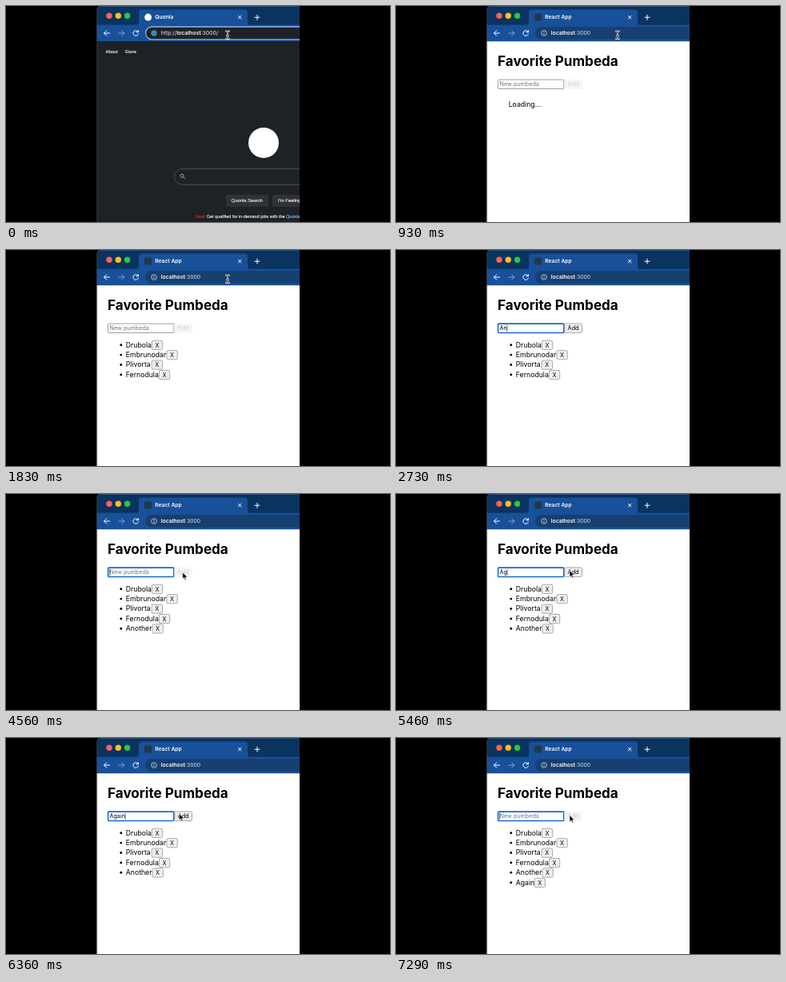
An HTML page for the animation above (8000 ms loop, 480 by 270 pixels).

```html
<!DOCTYPE html>
<html lang="en">
<head>
<meta charset="utf-8">
<title>Favorites</title>
<style>
  html, body { margin: 0; width: 100%; height: 100%; overflow: hidden; background: #000; }
  svg { display: block; width: 100%; height: 100%; }
  text { font-family: Inter, Roboto, sans-serif; white-space: pre; }
  .search { color: #e8eaed; font-family: "Liberation Sans", Arial, sans-serif; }
  .search text { font-family: inherit; fill: currentColor; }
  .search .page, .search .page tspan { fill: currentColor; stroke: currentColor; stroke-width: .16; }
  .line { fill: none; stroke: #fff; stroke-width: 1; stroke-linecap: round; stroke-linejoin: round; }
  .bold { font-weight: 600; }
</style>
</head>
<body>
<svg viewBox="0 0 480 270">
  <defs>
    <clipPath id="window"><path d="M113.5 270V5Q113.5 0 118.5 0H367V270Z"/></clipPath>
  </defs>
  <rect width="480" height="270"/>
  <g clip-path="url(#window)">
    <rect x="113" width="254" height="25" fill="#0a335f"/>
    <rect x="113" y="23.600" width="254" height="21" fill="#18509a"/>
    <path d="M162 24.5Q166 24.5 166 20V8.500Q166 4.500 170 4.500H298Q302 4.500 302 8.500V20Q302 24.500 306 24.500Z" fill="#18509a"/>
    <circle cx="129" cy="12.200" r="3.700" fill="#ff5f57"/>
    <circle cx="140.300" cy="12.200" r="3.700" fill="#febc2e"/>
    <circle cx="151.600" cy="12.200" r="3.700" fill="#28c840"/>
    <rect id="tabIcon" x="173.100" y="9.600" width="9" height="9"/>
    <text id="tabTitle" class="bold" x="186.300" y="16.200" font-size="6.700" fill="#fff"></text>
    <path class="line" d="M290.400 12.200l3.700 3.700m0-3.700l-3.700 3.700M314 11.200v6m-3-3h6"/>
    <path class="line" d="M129.600 34h-7m3.200-3.300l-3.300 3.300l3.300 3.300"/>
    <path class="line" stroke-opacity=".45" d="M140.700 34h7m-3.200-3.300l3.300 3.300l-3.300 3.300"/>
    <path class="line" d="M165 32.200A3.300 3.300 0 1 0 165.400 35M165.400 30.500v2.200h-2.200"/>

    <g id="searchPage" class="search">
      <rect x="174.600" y="26" width="210" height="15.800" rx="7.900" fill="#1f2328" stroke="#8ab8f0" stroke-width="1.300"/>
      <circle cx="185" cy="34" r="3.700" fill="#3f88b2"/>
      <text x="193.700" y="36.200" font-size="6.850" style="font-family:Inter,Roboto,sans-serif">http://<tspan class="bold" fill="#fff">localhost</tspan>:3000/</text>
      <rect x="113" y="44.200" width="254" height="226" fill="#1d2226"/>
      <circle cx="322" cy="171" r="19" fill="#fff"/>
      <rect x="210.500" y="203.700" width="220" height="19.500" rx="9.750" fill="none" stroke="#5f6368" stroke-width=".7"/>
      <path class="line" style="stroke:#aab0b6;stroke-width:.9" d="M222.200 212.300a2.100 2.100 0 1 0-4.200 0a2.100 2.100 0 1 0 4.200 0M221.700 213.900l1.900 2"/>
      <rect x="275" y="236" width="53" height="15" rx="1.800" fill="#303235"/>
      <rect x="333" y="236" width="60" height="15" rx="1.800" fill="#303235"/>
      <text class="page" x="124.600" y="59.200" font-size="5.900">About</text>
      <text class="page" x="148.600" y="59.200" font-size="5.900">Store</text>
      <text class="page" x="281.600" y="245.400" font-size="5.900">Quonla Search</text>
      <text class="page" x="340" y="245.400" font-size="5.900">I'm Feeling Lucky</text>
      <text class="page" x="236.700" y="265.200" font-size="5.480"><tspan color="#d9251d">New!</tspan> Get qualified for in-demand jobs with the <tspan color="#8ab4f8">Quonla</tspan></text>
    </g>

    <g id="appPage">
      <rect x="174" y="26" width="210" height="15.800" rx="7.900" fill="#173f70"/>
      <circle cx="185" cy="34" r="3.300" fill="none" stroke="#d5dde8" stroke-width=".8"/>
      <path class="line" style="stroke:#d5dde8;stroke-width:.9" d="M185 33.800v1.700m0-3.300v.01"/>
      <text x="193.700" y="36.200" font-size="6.850" fill="#d6e0ec"><tspan class="bold" fill="#fff">localhost</tspan>:3000</text>
      <rect x="113" y="44.200" width="254" height="226" fill="#fff"/>
      <text x="127" y="75.300" font-size="17.100" font-weight="700">Favorite Pumbeda</text>
      <rect id="field" x="127.600" y="92.100" width="82.200" height="11.400" rx="1" fill="#fff"/>
      <text id="entry" x="129.500" y="100.300" font-size="7.200"></text>
      <path id="caret" stroke="#000" stroke-width=".6"/>
      <rect id="add" x="210.800" y="91.900" width="21.700" height="11.600" rx="1.700" stroke-width=".6"/>
      <text id="addText" x="221.600" y="100.300" font-size="7.300" text-anchor="middle">Add</text>
      <text id="loading" x="140.700" y="125.700" font-size="8.700">Loading...</text>
      <g id="list"></g>
    </g>

    <g id="beam" fill="none" stroke-linecap="round">
      <path id="beamEdge" stroke="#fff" stroke-width="2"/>
      <path id="beamCore" stroke="#222" stroke-width=".8"/>
    </g>
    <path id="arrow" d="M0 0V8.200L1.900 6.500L3.200 9.400L4.600 8.800L3.300 6H5.900Z" stroke="#fff" stroke-width=".6"/>
    <path d="M113.700 5Q113.700 .3 118.500 .3H367" fill="none" stroke="#53687e" stroke-width=".6"/>
    <path d="M113.700 5V270" stroke="#80583e" stroke-width=".7"/>
  </g>
</svg>
<script>
const LOOP = 8000;
const $ = id => document.getElementById(id);
const show = (id, on) => $(id).setAttribute("display", on ? "inline" : "none");
const set = (id, attrs) => {
  for (const key in attrs) $(id).setAttribute(key, attrs[key]);
};

const beam = "M275 31.500Q277 31.500 277 33V39.500Q277 41 275 41M279 31.500Q277 31.500 277 33M279 41Q277 41 277 39.500M275.800 37.600h2.400";
set("beamEdge", { d: beam });
set("beamCore", { d: beam });

const names = ["Drubola", "Embrunodar", "Plivorta", "Fernodula", "Another", "Again"];
const buttonX = [182, 200.6, 181.8, 191, 182.6, 172.7];
const steps = [
  { at: 0, page: "search", beam: true },
  { at: 930, count: 0, beam: true },
  { at: 1830, count: 4, beam: true },
  { at: 2730, count: 4, focus: true, typed: "An" },
  { at: 3660, count: 4, focus: true, typed: "Another", arrow: [220.8, 98] },
  { at: 4560, count: 5, focus: true, arrow: [220.8, 98] },
  { at: 5460, count: 5, focus: true, typed: "Ag", arrow: [217, 95.5] },
  { at: 6360, count: 5, focus: true, typed: "Again", arrow: [216.5, 94.5] },
  { at: 7290, count: 6, focus: true, arrow: [217, 96.5] }
];

$("list").innerHTML = names.map((name, i) => {
  const y = 121.6 + i * 12.4, x = buttonX[i];
  return `<g><circle cx="143.800" cy="${y - 2.9}" r="1.450"/>
    <text x="149.800" y="${y}" font-size="8.700">${name}</text>
    <rect x="${x + 0.3}" y="${y - 8.4}" width="13.400" height="11.200" rx="1.700" fill="#efefef" stroke="#767676" stroke-width=".6"/>
    <text x="${x + 7}" y="${y - 0.1}" font-size="7.300" text-anchor="middle">X</text></g>`;
}).join("");

function drawApp({ count, typed = "", focus }) {
  $("entry").textContent = typed || "New pumbeda";
  set("entry", { fill: typed ? "#000" : "#757575" });
  set("field", {
    stroke: focus ? "#1769cf" : "#767676",
    "stroke-width": focus ? 1.6 : 0.7
  });
  const x = 129.7 + (typed ? $("entry").getComputedTextLength() : 0);
  set("caret", { d: `M${x} 93.800V101.800` });
  show("caret", focus);
  set("add", { fill: typed ? "#efefef" : "#f5f5f5", stroke: typed ? "#767676" : "#f3f3f3" });
  set("addText", { fill: typed ? "#000" : "#cecece" });
  show("loading", !count);
  [...$("list").children].forEach((row, i) =>
    row.setAttribute("display", i < count ? "inline" : "none"));
}

function draw(step) {
  const search = step.page === "search";
  show("searchPage", search);
  show("appPage", !search);
  $("tabTitle").textContent = search ? "Quonla" : "React App";
  set("tabIcon", search ? { fill: "#fff", rx: 4.5 } : { fill: "#22384a", rx: 1 });
  show("beam", step.beam);
  show("arrow", step.arrow);
  if (step.arrow) set("arrow", { transform: `translate(${step.arrow})` });
  if (!search) drawApp(step);
}

const start = performance.now();
let current;
function tick() {
  const t = (performance.now() - start) % LOOP;
  const step = steps.findLast(s => s.at <= t);
  if (step !== current) draw(current = step);
  requestAnimationFrame(tick);
}
tick();
</script>
</body>
</html>
```
